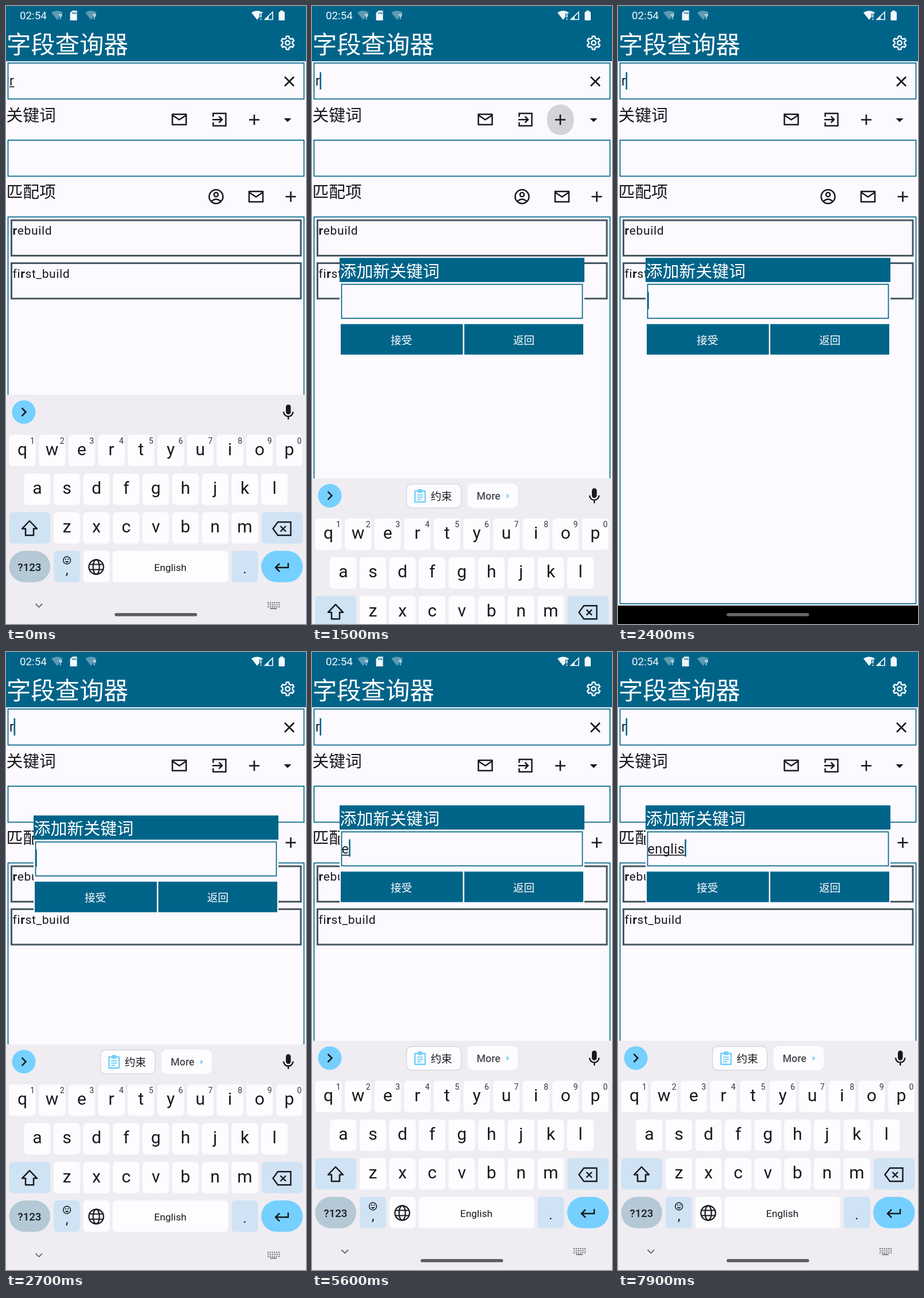
Animation, 522 px wide and 1073 px high, one loop 8000 ms. Source, as an HTML page:

```html
<!DOCTYPE html>
<html lang="zh-CN">
<head>
<meta charset="utf-8">
<title>字段查询器</title>
<style>
  html, body { margin: 0; width: 100%; height: 100%; overflow: hidden; background: #fcfaff; }
  svg { display: block; width: 522px; height: 1073px; }
  text { font-family: Roboto, "Noto Sans CJK SC", "Noto Sans CJK", sans-serif; white-space: pre; }
</style>
</head>
<body>
<svg id="stage" viewBox="0 0 522 1073"></svg>
<script>
const LOOP = 8000;
const TEAL = '#006489', PAPER = '#fcfaff', INK = '#17191c', KEY = '#fdfcff', SOFT = '#d0e3f4', SKY = '#75d0ff';

const rect = (x, y, w, h, fill, extra = '') =>
  `<rect x="${x}" y="${y}" width="${w}" height="${h}" fill="${fill}" ${extra}/>`;
const frame = (x, y, w, h, color = TEAL, sw = 1.7) =>
  rect(x, y, w, h, 'none', `stroke="${color}" stroke-width="${sw}"`);
const text = (x, y, size, str, fill = INK, extra = '') =>
  `<text x="${x}" y="${y}" font-size="${size}" fill="${fill}" ${extra}>${str}</text>`;
const mid = (x, y, size, str, fill = INK, extra = '') =>
  text(x, y, size, str, fill, 'text-anchor="middle" ' + extra);
const line = (d, sw = 2.5, color = INK, extra = '') =>
  `<path d="${d}" fill="none" stroke="${color}" stroke-width="${sw}" ${extra}/>`;
const fill = (d, color = INK) => `<path d="${d}" fill="${color}"/>`;
const ring = (x, y, r, sw, color = INK) =>
  `<circle cx="${x}" cy="${y}" r="${r}" fill="none" stroke="${color}" stroke-width="${sw}"/>`;
const group = (id, body) => `<g id="${id}">${body}</g>`;
const at = (x, y, body) => `<g transform="translate(${x} ${y})">${body}</g>`;

const mail = (x, y) => at(x, y, line('M-12-9H12V9H-12ZM-12-7.5L0 .5 12-7.5', 2.5, INK, 'stroke-linejoin="round"'));
const plus = (x, y) => at(x, y, line('M-9 0H9M0-9V9', 2.6));
const fan = (x, y, color) => at(x, y, fill('M-10-4.5Q0-11 10-4.5L0 8Z', color));

function gear(x, y) {
  const pts = [];
  for (let k = 0; k < 6; k++) {
    for (const [r, a] of [[8.6, -19], [11.6, -11], [11.6, 11], [8.6, 19]]) {
      const q = (k * 60 + a) * Math.PI / 180;
      pts.push((r * Math.sin(q)).toFixed(2) + ' ' + (-r * Math.cos(q)).toFixed(2));
    }
  }
  return at(x, y, line('M' + pts.join('L') + 'Z', 2.5, '#f2f9fd', 'stroke-linejoin="round"') +
    ring(0, 0, 3.8, 2.4, '#f2f9fd'));
}

function statusBar() {
  const pale = '#5d9bb4', white = '#f2f9fd';
  const weak = x => fan(x, 16, pale) + text(x + 2.5, 22.5, 13, '?', white, 'font-weight="700"');
  return text(24, 23, 18.8, '02:54', white) + weak(89) + weak(148) +
    fill('M115.500 8H123.500V25H111.500V12Z', white) +
    line('M116 10.500V14M118.700 10.500V14M121.400 10.500V14', 1.3, TEAL) +
    fan(437, 16, white) + rect(441, 13, 6, 12, TEAL) +
    line('M443.500 13.500V20M443.500 22V24', 2, white) +
    line('M464 10.500V23.500H450.500Z', 1.7, white) + fill('M457 17V24H450Z', white) +
    rect(474.500, 10, 10.500, 15, white, 'rx="1.5"') + rect(477, 8, 5.500, 3, white);
}

function page() {
  const item = (y, str) => frame(9.5, y, 503.500, 61.500, '#485761', 3) +
    text(11.5, y + 25, 21, str, INK, 'letter-spacing=".65"');
  const bold = s => `<tspan font-weight="700">${s}</tspan>`;
  return rect(0, 0, 522, 1073, PAPER) + rect(0, 0, 522, 96, TEAL) + statusBar() +
    text(1, 82, 42.3, '字段查询器', '#fff') + gear(490, 64) +
    frame(3.5, 99, 515, 62.500) + text(6, 138, 23, 'r') +
    `<rect id="mainLine" x="6" y="139.500" width="8.500" height="1.600" fill="${INK}"/>` +
    `<rect id="mainCaret" x="13.500" y="115" width="2.600" height="30" fill="${TEAL}"/>` +
    line('M485 123L501 139M501 123L485 139', 2.7) +
    text(0.5, 199.500, 28.8, '关键词') +
    rect(409, 171, 46.500, 53, '#d4d3d8', 'id="ripple" rx="22.500" ry="24"') +
    mail(301.5, 197) +
    line('M360.500 192.500V186.500H382.500V208H360.500V202M359 197.200H375.500M370.500 191.700L376 197.200 370.500 202.700', 2.5) +
    plus(432, 197.500) + fill('M483.500 195H496.500L490 201.500Z') +
    frame(3.5, 233, 515, 62.500) +
    text(0.5, 332.500, 28.8, '匹配项') +
    ring(365.5, 331, 12, 2.5) + ring(365.5, 327.500, 3.6, 2.4) +
    line('M357.500 339Q365.500 332 373.500 339', 2.5) +
    mail(435, 331) + plus(495.5, 331) +
    frame(3.5, 366.300, 515, 671.500) +
    item(372, bold('r') + 'ebuild') + item(446.5, 'fi' + bold('r') + 'st_build') +
    rect(0, 1041, 522, 32, '#000');
}

function dialog() {
  return rect(48, 0, 426, 174, PAPER) + rect(48, 0, 426, 42, TEAL) +
    text(48.5, 33.500, 28.9, '添加新关键词', '#fff') +
    frame(51.5, 46, 419, 59) +
    rect(50, 115, 212.500, 53, TEAL) + rect(265, 115, 207, 53, TEAL) +
    mid(155.5, 149.500, 18.6, '接受', '#fff') + mid(368.5, 149.500, 18.6, '返回', '#fff') +
    '<text id="word" x="51.500" y="84" font-size="23" letter-spacing=".65" fill="' + INK + '"></text>' +
    `<rect id="wordLine" x="51.500" y="85.600" height="1.600" fill="${INK}"/>` +
    `<rect id="wordCaret" y="59" height="30" fill="${TEAL}"/>`;
}

function keyboard() {
  const top = r => 744.5 + 67.2 * r;
  const key = (x, r, w, color = KEY, rx = 6) => rect(x, top(r), w, 54.500, color, `rx="${rx}"`);
  let s = rect(0, 675, 522, 400, '#efedf2');
  [['qwertyuiop', 28.5], ['asdfghjkl', 54.3], ['zxcvbnm', 105.9]].forEach(([row, x0], r) => {
    [...row].forEach((c, i) => {
      const x = x0 + 51.6 * i;
      s += key(x - 23, r, 46) + mid(x, top(r) + 35.500, 30, c);
      if (!r) s += mid(x + 17.5, 760, 14, (i + 1) % 10, '#33363a');
    });
  });
  s += key(5.5, 2, 71.500, SOFT) + key(444.5, 2, 72, SOFT) +
    key(5.5, 3, 71.500, '#b4c8d5', 27.2) + key(83, 3, 45.800, SOFT) + key(134.5, 3, 45.800) +
    key(185.5, 3, 201) + key(392.5, 3, 46, SOFT) + key(444, 3, 72.500, SKY, 27.2);
  s += line('M41 894L54 907.500H48V919H34V907.500H28Z', 2.5, INK, 'stroke-linejoin="round"') +
    line('M473 896H495.500V919H473L464.500 907.500ZM477.500 903L487 912.500M487 903L477.500 912.500', 2.4) +
    mid(41, 981, 18.6, '?123', INK, 'font-weight="500"') +
    ring(106, 962.500, 6.4, 1.5) + rect(102.8, 959.500, 2, 2, INK) + rect(107.2, 959.500, 2, 2, INK) +
    fill('M102.500 964H109.500Q106 969 102.500 964Z') + mid(106, 987, 24, ',') +
    ring(157, 974, 12.7, 2.3) + line('M145 969.500H169M145 978.500H169', 2.2) +
    `<ellipse cx="157" cy="974" rx="5.500" ry="12.700" fill="none" stroke="${INK}" stroke-width="2.200"/>` +
    mid(286, 980.500, 17.4, 'English') + mid(415.5, 985, 24, '.') +
    line('M491 967V975H469.500M476 968L469 975 476 982', 2.5);
  s += `<circle cx="31" cy="705" r="20.500" fill="${SKY}"/>` + line('M27.500 698L34.500 705 27.500 712') +
    rect(487, 692, 8.500, 17, INK, 'rx="4.250"') +
    line('M483 704.500A8.200 8.200 0 0 0 499.400 704.500M491.200 712.500V718', 2.4);
  s += group('chips',
    rect(164.5, 684.700, 95, 41.500, KEY, 'rx="9" stroke="#d6d5da" stroke-width="1.400"') +
    line('M179.200 697H196.800V716H179.200Z', 2.3, '#70cef8', 'stroke-linejoin="round"') +
    rect(184, 693.500, 8, 6.500, '#70cef8', 'rx="1.500"') +
    line('M183 703.500H193M183 707.500H193M183 711.500H190', 1.9, '#70cef8') +
    text(206.5, 713, 18.6, '约束') +
    rect(270.5, 684, 87.500, 42, KEY, 'rx="9"') +
    text(286.5, 712, 17.8, 'More', '#484b4f', 'font-weight="500"') +
    fill('M338.500 701L343.500 705.500 338.500 710Z', '#83d3fa'));
  s += line('M51.500 1038L57.300 1043.800 63 1038', 1.8, '#5f6267');
  for (let r = 0; r < 3; r++)
    for (let i = 0; i < 6; i++)
      s += rect(455 + i * 3.8 + (r === 1 ? 0.5 : 0), 1035 + r * 3.6, 2, 2, '#66696e');
  return s + rect(459.5, 1045.300, 11.500, 1.800, '#66696e');
}

const stage = document.getElementById('stage');
stage.innerHTML = group('page', page()) + group('dialog', dialog()) + group('keys', keyboard()) +
  rect(189, 1054, 143.500, 5.600, '#5d5d61', 'id="pill" rx="2.800"');
const $ = id => document.getElementById(id);
const show = (id, on) => $(id).setAttribute('visibility', on ? 'visible' : 'hidden');

const span = (t, start, len) => Math.min(1, Math.max(0, (t - start) / len));
const left = p => (1 - p) ** 3;
const WORD = 'englis', TYPED = [5300, 6000, 6400, 7000, 7400, 7800];
const FOCUS = 2300, KEYS_H = 398;

function draw(t) {
  show('chips', t >= 100);
  show('mainLine', t < 1400);
  show('mainCaret', t >= 1400 || (t >= 100 && (t - 100) % 1000 < 500));
  $('ripple').setAttribute('opacity', span(t, 1250, 150) * (1 - span(t, 1800, 300)));

  const drop = t < 2000 ? KEYS_H * span(t, 1350, 250) ** 2 : KEYS_H * left(span(t, 2450, 335));
  $('keys').setAttribute('transform', `translate(0 ${drop.toFixed(2)})`);
  show('pill', drop < 1 || drop >= KEYS_H);
  $('pill').setAttribute('fill', drop >= KEYS_H ? '#686868' : '#5d5d61');

  const y = 266.3 + 171 * left(span(t, 2520, 340));
  $('dialog').setAttribute('transform', `translate(0 ${y.toFixed(2)})`);
  $('dialog').setAttribute('display', t >= 1500 ? 'inline' : 'none');

  const n = TYPED.filter(k => t >= k).length;
  const last = n ? TYPED[n - 1] : FOCUS;
  const word = $('word');
  if (word.textContent !== WORD.slice(0, n)) word.textContent = WORD.slice(0, n);
  const w = n && t >= 1500 ? word.getComputedTextLength() : 0;
  $('wordLine').setAttribute('width', w);
  $('wordLine').setAttribute('opacity', n && t - last >= 100 ? 1 : 0);
  $('wordCaret').setAttribute('x', n ? 51.3 + w : 52);
  $('wordCaret').setAttribute('width', n ? 2.6 : 1.7);
  $('wordCaret').setAttribute('opacity', t >= FOCUS && (t - last) % 1000 < 500 ? 1 : 0);
}

const begin = performance.now();
function tick() {
  draw((performance.now() - begin) % LOOP);
  requestAnimationFrame(tick);
}
tick();
</script>
</body>
</html>
```
